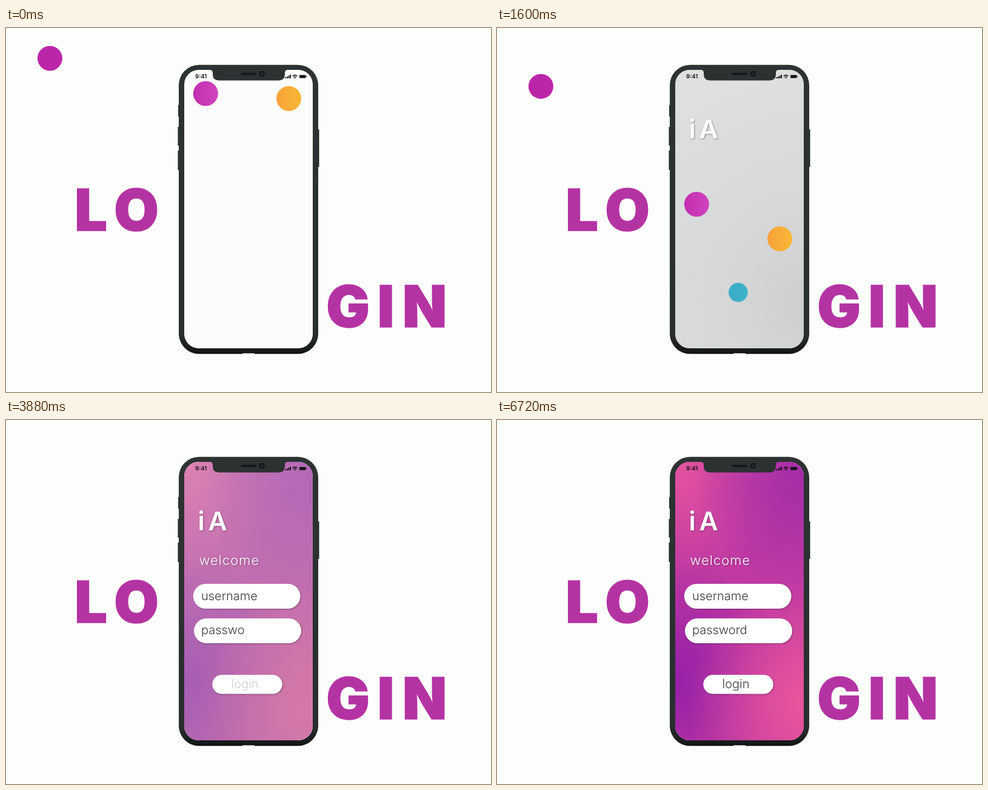
Recreate the animation shown at these times as an HTML page. Size 800 px wide and 600 px high, loop 7.04 s.

```html
<!DOCTYPE html>
<html lang="en">
<head>
<meta charset="utf-8">
<title>Login</title>
<style>
  html, body { margin: 0; width: 100%; height: 100%; overflow: hidden; background: #fcfefb; }
  svg { display: block; width: 800px; height: 600px; font-family: Inter, sans-serif; font-optical-sizing: none; }
  .big { font-size: 95px; font-weight: 900; fill: #b433a3; stroke: #b433a3; stroke-width: 1.5px; }
  .field { font-size: 20px; font-weight: 300; fill: #36383e; }
  .raised { fill: #fff; filter: drop-shadow(1px 1.5px 1px rgba(40, 30, 50, .45)); }
</style>
</head>
<body>
<svg viewBox="0 0 800 600">
  <defs>
    <clipPath id="screen"><rect x="294" y="69" width="212" height="459" rx="24"/></clipPath>
    <linearGradient id="body" x2="0" y2="1">
      <stop stop-color="#2d3233"/><stop offset=".93" stop-color="#2a2f30"/><stop offset="1" stop-color="#121516"/>
    </linearGradient>
    <radialGradient id="gray" gradientUnits="userSpaceOnUse" cx="520" cy="450" r="430">
      <stop stop-color="#b5b3b5"/><stop offset=".3" stop-color="#bfc1c3"/>
      <stop offset=".6" stop-color="#c6c9cb"/><stop offset="1" stop-color="#cfd2d2"/>
    </radialGradient>
    <linearGradient id="purple"><stop stop-color="#c22dae"/><stop offset="1" stop-color="#d044bf"/></linearGradient>
    <linearGradient id="orange"><stop stop-color="#f9a13c"/><stop offset="1" stop-color="#f7b832"/></linearGradient>
    <linearGradient id="teal"><stop stop-color="#3cabc8"/><stop offset="1" stop-color="#3cb4c9"/></linearGradient>
  </defs>

  <circle id="ball" cx="72.4" r="20.5" fill="#bb26a8"/>
  <g class="big" text-anchor="middle">
    <text x="140" y="333.6">L</text><text x="215" y="333.6">O</text>
    <text x="564" y="493.4">G</text><text x="626.5" y="493.4">I</text><text x="690.5" y="493.4">N</text>
  </g>

  <path d="M285.5 127v19M285 163v31M285 202v32M515 167v62" stroke="#24292a" stroke-width="3"/>
  <rect x="285" y="60.8" width="230" height="476.4" rx="33.5" fill="url(#body)"/>
  <rect x="390" y="536.2" width="20" height="1.5" fill="#fcfefb"/>
  <g clip-path="url(#screen)">
    <rect x="294" y="69" width="212" height="459" fill="#fcfdfb"/>
    <rect id="grayLayer" x="294" y="69" width="212" height="459" fill="url(#gray)"/>
    <g id="colorLayer"><rect x="294" y="69" width="212" height="459" fill="#c03aa2"/></g>
    <text id="logo" class="raised" x="316.5 333.5" y="182" font-size="43" font-weight="600">iA</text>
    <text id="welcome" class="raised" x="318.5" y="239" font-size="22" font-weight="300" letter-spacing="1">welcome</text>
    <g id="pills"></g>
    <text id="user" class="field" x="322" y="297"></text>
    <text id="pass" class="field" x="322" y="353"></text>
    <text id="login" class="field" x="394" y="442" text-anchor="middle">login</text>
  </g>

  <path d="M336 69q5 0 5 5v2q0 10.5 11 10.5h97q11 0 11-10.5v-2q0-5 5-5z" fill="#2c3132"/>
  <rect x="387" y="73.8" width="26" height="3.6" rx="1.8" fill="#14181a"/>
  <circle cx="422" cy="75.5" r="4.8" fill="#14181a"/><circle cx="422" cy="75.5" r="2" fill="#2a3034"/>
  <g fill="#111">
    <text x="312" y="83.3" font-size="9.6" font-weight="600">9:41</text>
    <path d="M460.3 81h1.8v2h-1.8zM463 80h1.8v3h-1.8zM465.6 78.6h1.8v4.4h-1.8zM468.2 77h1.8v6h-1.8z"/>
    <path d="M472.6 79.3q3.9-3.6 7.8 0M474.2 81q2.3-2 4.6 0" fill="none" stroke="#111" stroke-width="1.2"/>
    <circle cx="476.5" cy="82.3" r="1"/>
    <rect x="484" y="77.5" width="10.4" height="5" rx="1"/><rect x="495" y="79" width="1" height="2"/>
  </g>
</svg>
<script>
const LOOP = 7040, STEP = 40;
const NS = 'http://www.w3.org/2000/svg';
const $ = id => document.getElementById(id);
const lerp = (a, b, k) => a + (b - a) * k;
const ramp = (t, from, to) => Math.min(1, Math.max(0, (t - from) / (to - from)));
const ease = (t, from, to) => { const k = ramp(t, from, to); return k * k * (3 - 2 * k); };
const typed = (word, t, start) => word.slice(0, Math.max(0, Math.floor((t - start) / 100)));

function add(parent, tag, attrs) {
  const el = document.createElementNS(NS, tag);
  set(el, attrs);
  return parent.appendChild(el);
}
function set(el, attrs) {
  for (const name in attrs) el.setAttribute(name, attrs[name]);
}

// Soft colour glows over the base: centre, radius, colour
[[294, 69, 190, '#e4539f'], [510, 90, 190, '#a52da8'],
 [290, 430, 200, '#9620a6'], [515, 465, 200, '#ea569b']].forEach(([cx, cy, r, color], i) => {
  const glow = add(document.querySelector('defs'), 'radialGradient',
    { id: 'glow' + i, gradientUnits: 'userSpaceOnUse', cx, cy, r });
  add(glow, 'stop', { 'stop-color': color });
  add(glow, 'stop', { offset: .3, 'stop-color': color, 'stop-opacity': .75 });
  add(glow, 'stop', { offset: 1, 'stop-color': color, 'stop-opacity': 0 });
  add($('colorLayer'), 'rect', { x: 294, y: 69, width: 212, height: 459, fill: `url(#glow${i})` });
});

// Balls that travel to their place, then widen into white pills; x and w are [ball, pill]
const pills = [
  { fill: 'purple', h: 41, x: [308.8, 308.8], w: [41, 176.7], y: [87.5, 270], move: [0, 970], grow: [1880, 2880] },
  { fill: 'orange', h: 41, x: [446, 310], w: [41, 177], y: [95.7, 327], move: [0, 1017], grow: [2560, 3360] },
  { fill: 'teal', h: 31.6, x: [382, 340.3], w: [31.6, 115.4], y: [536, 420], move: [200, 1050], grow: [3066, 3866] }
];
for (const p of pills) {
  p.color = add($('pills'), 'rect', { fill: `url(#${p.fill})` });
  p.white = add($('pills'), 'rect', { class: 'raised' });
}

function ballY(t) {
  return t < 760 ? lerp(50, 506, ease(t, 0, 744)) : lerp(506, -40, ease(t, 760, 2006));
}

function draw(t) {
  set($('ball'), { cy: ballY(t) });
  set($('grayLayer'), { opacity: ramp(t, 0, 2480) });
  set($('colorLayer'), { opacity: ramp(t, 2400, 4320) ** 1.8 });
  set($('logo'), { opacity: ramp(t, 100, 800) });
  set($('welcome'), { opacity: ramp(t, 2000, 2900) });
  for (const p of pills) {
    const k = ease(t, ...p.grow), white = ramp(k, 0, .35);
    const box = {
      x: lerp(...p.x, k), y: lerp(...p.y, ease(t, ...p.move)),
      width: lerp(...p.w, k), height: p.h, rx: p.h / 2
    };
    set(p.color, { ...box, opacity: white < 1 ? 1 : 0 });
    set(p.white, { ...box, opacity: white });
  }
  $('user').textContent = typed('username', t, 2080);
  $('pass').textContent = typed('password', t, 3240);
  set($('pass'), { opacity: ramp(t, 3200, 3900) });
  set($('login'), { opacity: ramp(t, 3760, 4240) });
}

function tick() {
  const t = performance.now() % LOOP;
  draw(Math.floor(t / STEP) * STEP);
  requestAnimationFrame(tick);
}
tick();
</script>
</body>
</html>
```
